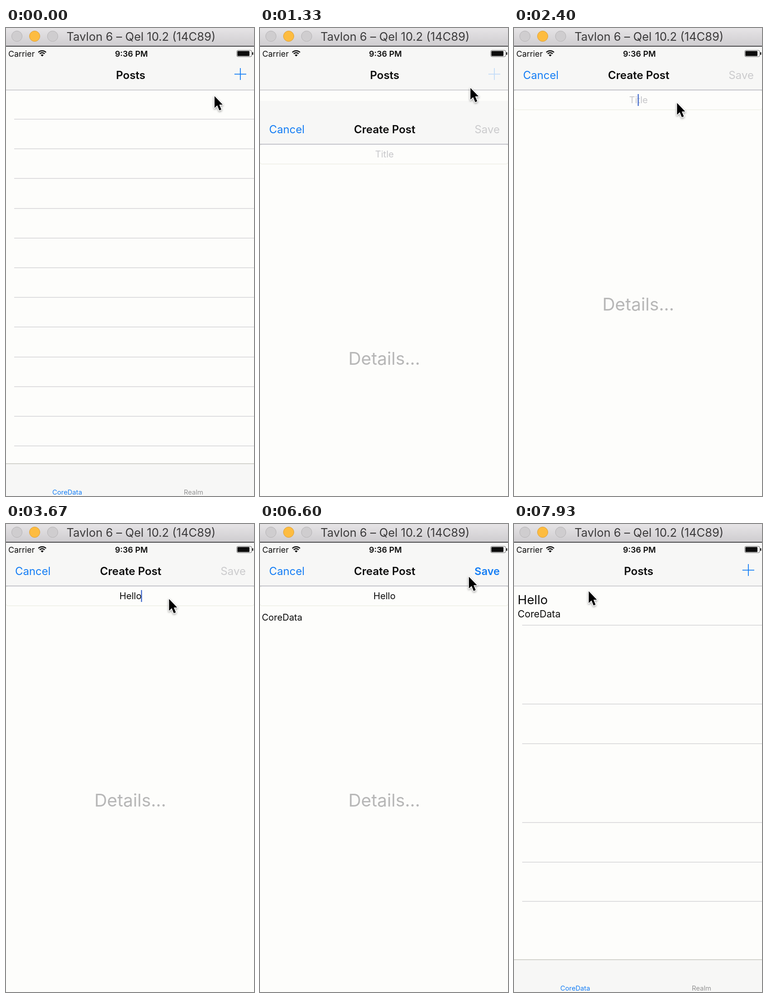
Write an HTML page with a canvas that moves like this. It is 545 by 1027 pixels and loops after 8 s.

```html
<!DOCTYPE html>
<html lang="en">
<head>
<meta charset="utf-8">
<title>Posts app demo</title>
<style>
  html, body { margin: 0; width: 100%; height: 100%; overflow: hidden; background: #fdfdfb; }
  canvas { display: block; width: 545px; height: 1027px; }
</style>
</head>
<body>
<canvas id="stage" width="545" height="1027"></canvas>
<script>
const ctx = document.getElementById('stage').getContext('2d');
const W = 545, H = 1027, LOOP = 8000, TICK = 1000 / 15;
const BLUE = '#147df5', BAR = '#f7f7f6', PAGE = '#fdfdfb', INK = '#0c0c0c';
const SCREEN_TOP = 41, TRAVEL = H - SCREEN_TOP;
const PRESENT_AT = 1112.5, DISMISS_AT = 7246.5;

// Cursor waypoints: time, x, y
const cursorPath = [
  [0, 458, 149], [250, 458, 149], [850, 515, 104], [1200, 515, 104],
  [1533, 383, 171], [1733, 358, 164], [6200, 358, 164],
  [6800, 494, 98], [7733, 494, 98], [7933, 164, 147]
];

function rect(x, y, w, h, color) {
  ctx.fillStyle = color;
  ctx.fillRect(x, y, w, h);
}

function text(str, x, y, size, color = INK, align = 'left', weight = 400) {
  ctx.font = `${weight} ${size}px Inter, sans-serif`;
  ctx.textAlign = align;
  ctx.fillStyle = color;
  ctx.fillText(str, x, y);
  return ctx.measureText(str).width;
}

function circle(x, y, r, fill, stroke) {
  ctx.beginPath();
  ctx.arc(x, y, r, 0, Math.PI * 2);
  ctx.fillStyle = fill;
  ctx.fill();
  ctx.strokeStyle = stroke;
  ctx.lineWidth = 1;
  ctx.stroke();
}

function roundRect(x, y, w, h, r) {
  ctx.beginPath();
  ctx.roundRect(x, y, w, h, r);
}

// Critically damped spring, 0 to 1
function spring(ms) {
  const x = Math.max(0, ms) * 0.0165;
  return 1 - (1 + x) * Math.exp(-x);
}

function typed(word, t, start, end) {
  const progress = (t - start) / (end - start);
  return word.slice(0, Math.max(0, Math.floor(progress * (word.length - 1)) + 1));
}

function modalOffset(t) {
  if (t < PRESENT_AT) return TRAVEL;
  return Math.floor(TRAVEL * (t < DISMISS_AT ? 1 - spring(t - PRESENT_AT) : spring(t - DISMISS_AT)));
}

function drawTitleBar() {
  const shade = ctx.createLinearGradient(0, 0, 0, 40);
  shade.addColorStop(0, '#e6e4e6');
  shade.addColorStop(1, '#cecccf');
  rect(0, 0, W, 40, shade);
  rect(0, 39, W, 2, '#48484a');
  circle(24, 18, 11.5, '#cfcdcf', '#b5b3b5');
  circle(63, 18, 11.5, '#fdbc40', '#dc9f38');
  circle(102.5, 18, 11.5, '#cfcdcf', '#b5b3b5');
  text('Tavlon 6 – Qel 10.2 (14C89)', 133, 27.5, 25.4, '#3c3b3c');
}

function drawStatus() {
  text('Carrier', 5, 62.5, 17.8);
  text('9:36 PM', 275.5, 62.5, 17.8, INK, 'center', 600);

  ctx.strokeStyle = INK;
  ctx.lineWidth = 2.4;
  for (const r of [12, 7.7]) {
    ctx.beginPath();
    ctx.arc(79.5, 62, r, -Math.PI * 0.75, -Math.PI * 0.25);
    ctx.stroke();
  }
  ctx.beginPath();
  ctx.moveTo(79.5, 62.5);
  ctx.arc(79.5, 62.5, 4.6, -Math.PI * 0.75, -Math.PI * 0.25);
  ctx.fillStyle = INK;
  ctx.fill();

  roundRect(507, 49, 33, 14, 3);
  ctx.lineWidth = 1;
  ctx.strokeStyle = '#6c6c6c';
  ctx.stroke();
  roundRect(508.5, 50.5, 26.5, 11, 1.5);
  ctx.fill();
  roundRect(541, 53, 2.2, 6, 1);
  ctx.fill();
}

function drawNavBar(title) {
  rect(0, SCREEN_TOP, W, 95, BAR);
  rect(0, 135.5, W, 1.2, '#b4b4b9');
  text(title, 274, 112, 24, INK, 'center', 600);
}

function drawPosts(t) {
  const saved = t >= 7100;
  rect(0, SCREEN_TOP, W, H, PAGE);
  drawNavBar('Posts');

  const plus = t >= 930 && t < 2000 ? '#c3dcf8' : BLUE;
  rect(502, 100.4, 26, 1.8, plus);
  rect(514.1, 88, 1.8, 26, plus);

  const rows = saved ? [0, 2, 3, 5, 6, 7] : [...Array(12).keys()];
  for (const i of rows) {
    const y = saved ? 222 + 86.6 * i : 200 + 65.2 * i;
    rect(18, Math.round(y) - 0.5, W, 1.2, '#cbcace');
  }
  if (saved) {
    text('Hello', 8, 175.5, 27.5);
    text('CoreData', 8, 205, 21.2);
  }

  rect(0, 956, W, H - 956, BAR);
  rect(0, 955.5, W, 1.2, '#b9b9b0');
  text('CoreData', 134.5, 1024, 14.7, BLUE, 'center');
  text('Realm', 412, 1024, 14.7, '#949494', 'center');
}

function drawCaret(x, y, t, lastKey) {
  const idle = t - lastKey;
  if (idle < 500 || idle % 1000 < 550) rect(x - 1.2, y, 2.4, 26, '#4a70cf');
}

function drawModal(t) {
  const offset = modalOffset(t);
  if (offset >= TRAVEL) return;
  const heading = typed('Hello', t, 2870, 3600);
  const details = typed('CoreData', t, 4800, 5930);

  ctx.save();
  ctx.translate(0, offset);
  rect(0, SCREEN_TOP, W, H, PAGE);
  drawNavBar('Create Post');
  text('Cancel', 20, 112, 23.8, BLUE);

  const ready = heading && details;
  const pressed = t >= 7100;
  const saveColor = pressed ? '#e4e4e4' : ready ? BLUE : '#cbcbcd';
  text('Save', 527, 112, ready && !pressed ? 23.5 : 24, saveColor, 'right', ready && !pressed ? 600 : 400);

  roundRect(-0.5, 136.5, W + 1, 43, 5);
  ctx.strokeStyle = '#e7e8dc';
  ctx.lineWidth = 1;
  ctx.stroke();
  rect(0, 135.5, W, 1.2, '#b4b4c0');

  const width = text(heading || 'Title', 273.5, 165, 20.2, heading ? INK : '#c7c7ca', 'center');
  const detailsWidth = text(details, 4, 212, 20);
  text('Details...', 273, 620, 38.7, '#b7b7b7', 'center');

  if (t >= 4300) drawCaret(4 + detailsWidth, 192, t, t < 4800 ? 4300 : Math.max(4800, Math.min(t, 5930)));
  else if (t >= 2200) drawCaret(heading ? 273.5 + width / 2 : 273, 145, t, t < 2870 ? 2200 : Math.min(t, 3600));
  ctx.restore();
}

function drawCursor(t) {
  let i = 1;
  while (i < cursorPath.length - 1 && cursorPath[i][0] < t) i++;
  const [t0, x0, y0] = cursorPath[i - 1];
  const [t1, x1, y1] = cursorPath[i];
  const p = Math.min(1, (t - t0) / (t1 - t0));
  const eased = t0 < 1000 || t0 === 6200 ? p * p * (3 - 2 * p) : p;

  ctx.save();
  ctx.translate(x0 + (x1 - x0) * eased, y0 + (y1 - y0) * eased);
  const arrow = new Path2D('M.3 .6V26.5L6.2 20.8L10.8 31.8L15.2 29.9L10.7 19.2H18.2Z');
  ctx.shadowColor = 'rgba(0,0,0,.4)';
  ctx.shadowBlur = 4;
  ctx.shadowOffsetY = 2;
  ctx.strokeStyle = '#fff';
  ctx.lineWidth = 3;
  ctx.lineJoin = 'round';
  ctx.stroke(arrow);
  ctx.shadowColor = 'transparent';
  ctx.fillStyle = '#000';
  ctx.fill(arrow);
  ctx.restore();
}

function frame() {
  const t = Math.floor(((performance.now() + 4) % LOOP) / TICK) * TICK;
  drawPosts(t);
  drawModal(t);
  drawStatus();
  drawTitleBar();
  drawCursor(t);
  requestAnimationFrame(frame);
}
frame();
</script>
</body>
</html>
```
